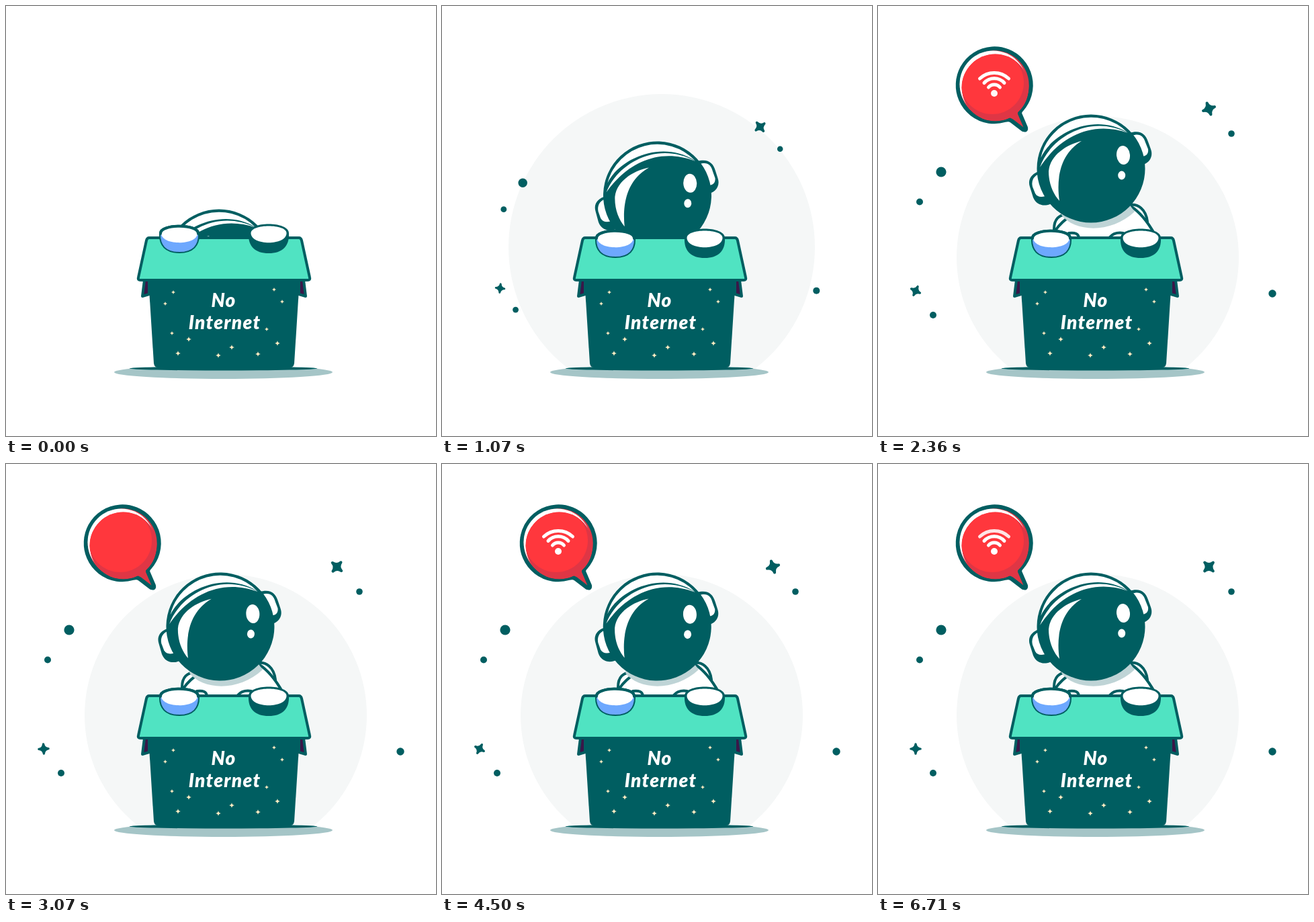
An HTML page for the animation above (7.21 s loop, 640 by 640 pixels).

```html
<!DOCTYPE html>
<html lang="en">
<head>
<meta charset="utf-8">
<title>No Internet</title>
<style>
  html, body { margin: 0; width: 100%; height: 100%; overflow: hidden; background: #fff; }
  svg { display: block; width: 100%; height: 100%; }
  .ink { fill: #005e61; }
  .line { stroke: #005e61; stroke-width: 4; stroke-linejoin: round; stroke-linecap: round; }
  .white { fill: #fff; }
  .none { fill: none; }
  .label { font: italic 900 28px Lato, "Open Sans", sans-serif; letter-spacing: 1.3px; fill: #fff; text-anchor: middle; }
  #wifi path { fill: none; stroke: #fff; stroke-width: 5; stroke-linecap: round; }
</style>
</head>
<body>
<svg viewBox="0 0 640 640">
  <defs>
    <path id="star" d="M0-9Q1-1 9 0Q1 1 0 9Q-1 1-9 0Q-1-1 0-9Z"/>
    <clipPath id="aboveGround"><path d="M0 0H640V540H0Z"/></clipPath>
    <clipPath id="redDisc"><circle cx="174.5" cy="121.5" r="50"/></clipPath>
  </defs>

  <circle id="halo" cx="327" fill="#f5f7f7" clip-path="url(#aboveGround)"/>
  <g id="particles" class="ink"></g>

  <g id="body">
    <path class="white line" d="M262 348V332C262 318 269 309 285 310L300 340Z"/>
    <path class="white line" d="M370 297C388 292 399 304 401 321L385 345Z"/>
    <path class="white line" d="M264 348V334C270 325 279 317 290 310L376 298C392 308 403 324 412 340V348"/>
    <path fill="#bfd4d6" d="M273 311C292 336 346 340 382 306L370 290H280Z"/>
    <path class="none line" d="M284 338Q298 336 299 345M345 344Q352 336 365 338"/>
  </g>

  <g id="head">
    <path class="ink" d="M240 246C230 249 222 257 226 269L231 285C236 297 248 299 258 294Z"/>
    <path class="white" d="M240 250C231 253 228 261 230 269L234 279C237 284 242 285 249 283Z"/>
    <path class="ink" d="M374 189C390 184 398 190 402 202L406 213C411 226 401 237 389 237Z"/>
    <path class="white" d="M378 193C389 189 395 193 398 203L402 213C403 220 399 224 392 224Z"/>
    <circle class="ink" cx="317" cy="242" r="80.5"/>
    <path class="white" d="M242.300 226A76.500 76.500 0 0 1 371 188C320 158 258 190 242.300 226Z"/>
    <path class="white" d="M241 240C256 196 315 160 372 189C315 169 268 198 241 240Z"/>
    <path class="white" d="M303 201C281 206 256 222 254 246C254 265 261 280 270 290C266 262 268 222 303 201Z"/>
    <ellipse class="white" cx="365" cy="222" rx="10" ry="14" transform="rotate(-5 365 222)"/>
    <ellipse class="white" cx="362.700" cy="252" rx="5.5" ry="6.5"/>
  </g>

  <ellipse cx="323.5" cy="545" rx="162.5" ry="10" fill="#a5c5c7"/>
  <ellipse class="ink" cx="323.5" cy="539.5" rx="140" ry="3"/>
  <g fill="#3a1748">
    <path class="line" d="M206 408L203 432L213 429V408Z"/>
    <path class="line" d="M443 408L446 432L436 429V408Z"/>
  </g>
  <path class="ink" d="M212 406H437L429 532Q428 538 423 538H226Q221 538 220 532Z"/>
  <path class="line" fill="#50e3c2" d="M213 345H436Q439 345 440 349L452 404Q453 408 449 408H200Q196 408 197 404L209 349Q210 345 213 345Z"/>
  <g id="sparkles" fill="#ffecc2"></g>
  <text class="label" x="324" y="448">No</text>
  <text class="label" x="325.5" y="481">Internet</text>

  <g id="gloves">
    <path class="line" style="stroke-width:2" fill="#6ea8fe" d="M229 345C229 330 287 330 287 345C288 364 278 374 258 374C238 374 228 364 229 345Z"/>
    <path class="white" d="M231 345C231 331 285 331 285 345C285 364 231 364 231 345Z"/>
    <path class="none line" d="M230 346C229 331 287 331 286 346"/>
    <path class="ink" d="M361 345C361 327 421 327 421 345C422 365 411 375 391 375C371 375 360 365 361 345Z"/>
    <path class="white" d="M364.500 345C364.500 331 417.500 331 417.500 345C417.500 364 364.500 364 364.500 345Z"/>
  </g>

  <g id="bubble">
    <path class="line" style="stroke-width:6" fill="#df3645" d="M214 154A54.5 54.5 0 1 0 189 170Q195 168 199 171L216 184Q221 186 220 181L211 160Q211 157 214 154Z"/>
    <circle class="white" cx="171.500" cy="116.500" r="50"/>
    <g clip-path="url(#redDisc)">
      <circle cx="174.5" cy="121.5" r="50" fill="#df3645"/>
      <circle cx="170" cy="114" r="47" fill="#ff373d"/>
    </g>
    <g id="wifi">
      <circle class="white" cx="173" cy="130" r="5"/>
      <path d="M164.500 121A11 11 0 0 1 181.500 121"/>
      <path d="M158 114.500A20 20 0 0 1 188 114.500"/>
      <path d="M151.500 108A31.400 31.400 0 0 1 194.500 108"/>
    </g>
  </g>
</svg>

<script>
const LOOP = 7210, FPS = 14, LAST_MOVE = 6290;
const $ = id => document.getElementById(id);
const clamp = v => Math.min(1, Math.max(0, v));
const progress = (t, from, to) => clamp((t - from) / (to - from));
const smooth = p => p * p * (3 - 2 * p);
const transform = (id, value) => $(id).setAttribute('transform', value);
const scaleAbout = (id, x, y, s) =>
  transform(id, `translate(${x} ${y}) scale(${s}) translate(${-x} ${-y})`);

// Eased value along [time, value] keys.
function track(t, ...keys) {
  let value = keys[0][1];
  for (let i = 1; i < keys.length; i++) {
    const [t0, v0] = keys[i - 1], [t1, v1] = keys[i];
    if (t >= t0) value = v0 + (v1 - v0) * smooth(progress(t, t0, t1));
  }
  return value;
}

const dots = [[94, 247, 7.6], [62, 291.5, 5], [82, 460, 5], [526, 190, 4.8], [587, 428, 5.7]];
const stars = [[492.5, 153, 1, 0], [56, 424, 0.8, 45]];
const sparkles = [[249, 426, 3], [237, 443, 3], [399, 422, 3], [411, 440, 3], [247, 487, 3], [272, 496, 4],
  [388, 481, 3], [256, 517, 4], [316, 520, 4], [336, 508, 4], [375, 518, 4], [404, 502, 4]];

$('particles').innerHTML =
  dots.map(([x, y, r]) => `<circle cx="${x}" cy="${y}" r="${r}"/>`).join('') +
  stars.map(() => '<use href="#star" class="line"/>').join('');
$('sparkles').innerHTML = sparkles.map(([x, y, r]) =>
  `<use href="#star" transform="translate(${x} ${y}) scale(${r / 9})"/>`).join('');
const starNodes = [...$('particles').querySelectorAll('use')];
const wifiParts = [...$('wifi').children];

function wifiOpacity(t, index) {
  const cycle = 2805, fade = 310, lag = index * 47;
  const phase = t - 2345 - lag;
  if (phase < 0) return 1;
  const p = phase % cycle;
  return p < 1155 ? 1 - progress(p, 0, fade) : progress(p, 1155, 1155 + fade);
}

function draw(t) {
  const rise = track(t, [70, 141], [1550, 7], [1750, 7], [2360, 0]);
  const tilt = track(t, [0, 0], [1650, 3], [1750, 3], [2360, 0], [3900, 2.7], [5700, 0]);
  transform('head', `translate(0 ${rise}) rotate(${tilt} 317 335)`);
  transform('body', `translate(0 ${track(t, [70, 141], [1550, 4], [2360, 0])})`);
  transform('gloves', `translate(0 ${track(t, [0, -7], [700, 0])})`);

  const radius = track(t, [500, 0], [1070, 228], [1550, 210]);
  $('halo').setAttribute('r', radius);
  $('halo').setAttribute('cy', 549 - 0.833 * radius);

  scaleAbout('particles', 325, 390, 1 - (1 - progress(t, 573, 1539)) ** 3);
  const turn = (Math.min(t, LAST_MOVE) - 3640) * 0.085;
  stars.forEach(([x, y, size, angle], i) =>
    starNodes[i].setAttribute('transform', `translate(${x} ${y}) rotate(${angle + turn}) scale(${size})`));

  scaleAbout('bubble', 230, 189, track(t, [1662, 0], [2070, 1.147], [2330, 1]));
  wifiParts.forEach((part, i) => part.setAttribute('opacity', wifiOpacity(t, i)));
}

// The motion advances in even steps and rests on the last one.
function tick() {
  const step = Math.floor((performance.now() % LOOP + 5) * FPS / 1000);
  draw(Math.min(step, 94) * 1000 / FPS);
  requestAnimationFrame(tick);
}
tick();
</script>
</body>
</html>
```
